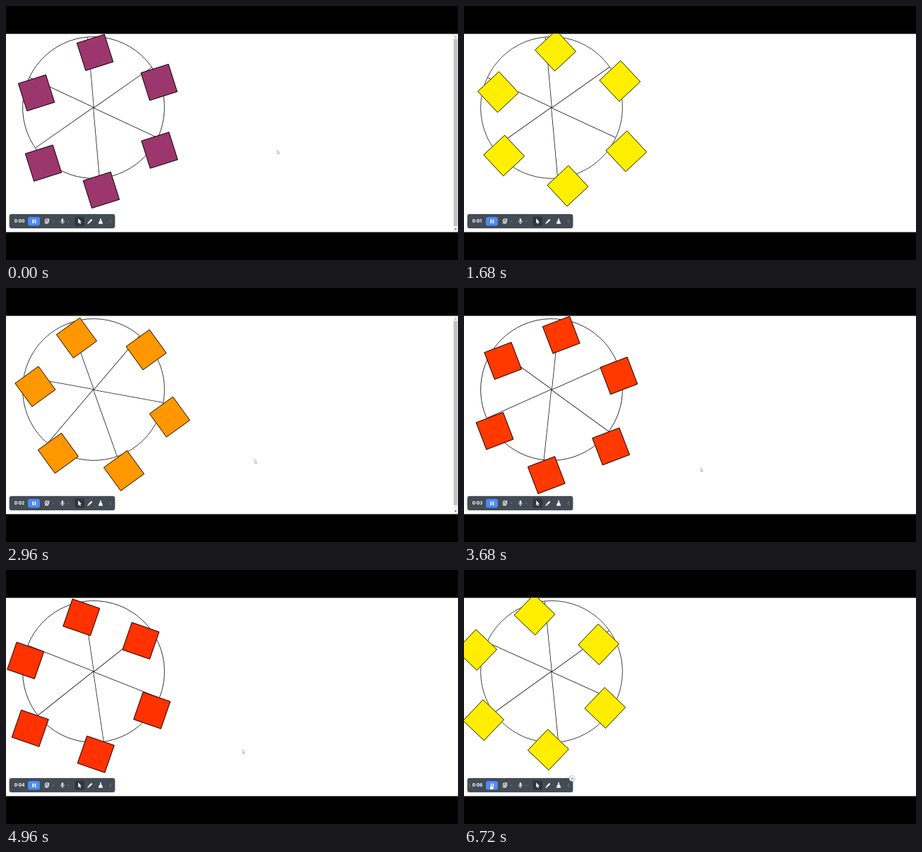
Animation of 640x360 px, one loop 6800 ms. Source, as an HTML page with a canvas:

```html
<!DOCTYPE html>
<html lang="en">
<head>
<meta charset="utf-8">
<title>Ferris wheel</title>
<style>
html, body { margin: 0; width: 100%; height: 100%; overflow: hidden; background: #000; }
canvas { display: block; width: 640px; height: 360px; }
</style>
</head>
<body>
<canvas id="stage" width="640" height="360"></canvas>
<script>
const ctx = document.getElementById('stage').getContext('2d');
const LOOP = 6800, STEP = 80;
const START = 205, SPEED = 0.0356;      // degrees, degrees per ms
const ZOOM = 0.4;                       // page pixels to stage pixels
const PAGE = { top: 40, w: 1600, h: 700, edge: 1 };
const HUB = { x: 310, y: 260 };         // wheel centre on the page
const RAD = Math.PI / 180;
const SIDE = 104;

// cabin pivots relative to the hub: three, then their opposites
const CABINS = [1, -1].flatMap(d => {
  const y = 1.25 + 216.25 * d;
  return [[240.5 * d, 0], [113 * d, y], [-125 * d - 12, y]];
});

const RED = [255, 25, 0], YELLOW = [255, 240, 0], PURPLE = [137, 20, 131];
const PAINT = [RED, YELLOW, PURPLE, YELLOW, RED];

// pointer moves: from ms, to ms, x, y
const REST = [384, 204];
const MOVES = [[800, 2400, 352, 243], [2960, 3600, 335, 254.5],
               [5120, 5760, 54, 293.5], [5840, 6240, 38, 303.5]];
const HOVER_AT = 5840, HAND_AT = 6000;

const BAR = '#434b55', INK = '#f4f5f6', DIM = '#9197a0';

const mix = (a, b, k) => a + (b - a) * k;
const clamp = k => Math.max(0, Math.min(1, k));

// cubic-bezier(.42, 0, .58, 1)
function easeInOut(x) {
  let lo = 0, hi = 1;
  for (let i = 0; i < 24; i++) {
    const s = (lo + hi) / 2, r = 1 - s;
    const bx = 3 * r * s * (0.42 * r + 0.58 * s) + s * s * s;
    if (bx < x) lo = s; else hi = s;
  }
  return lo * lo * (3 - 2 * lo);
}

function cabinColor(p) {
  const i = Math.floor(p * 4), k = easeInOut(p * 4 - i);
  return `rgb(${PAINT[i].map((v, n) => Math.round(mix(v, PAINT[i + 1][n], k)))})`;
}

// Lowest page point of the wheel's turned bounding box
function pageBottom(turn, spin) {
  const c = Math.cos(spin), s = Math.sin(spin);
  const xs = [-252, 252], ys = [-252, 252];
  for (const [px, py] of CABINS)
    for (const u of [-SIDE / 2, SIDE / 2])
      for (const v of [0, SIDE]) {
        xs.push(px + u * c - v * s);
        ys.push(py + u * s + v * c);
      }
  const reach = (list, k) => Math.max(...list.map(v => v * k));
  return HUB.y + reach(xs, Math.sin(turn)) + reach(ys, Math.cos(turn));
}

function drawWheel(turn, spin, color) {
  ctx.save();
  ctx.translate(HUB.x, HUB.y);
  ctx.rotate(turn);
  ctx.strokeStyle = ctx.fillStyle = '#1c1c1c';
  ctx.lineWidth = 2;
  ctx.beginPath();
  ctx.arc(0, 0, 251, 0, 7);
  ctx.stroke();
  for (let i = 0; i < 6; i++) {
    ctx.fillRect(0, 0, 250, 2);
    ctx.rotate(60 * RAD);
  }
  ctx.strokeStyle = '#000';
  ctx.fillStyle = color;
  for (const [x, y] of CABINS) {
    ctx.save();
    ctx.translate(x, y);
    ctx.rotate(spin);
    ctx.fillRect(-SIDE / 2, 0, SIDE, SIDE);
    ctx.strokeRect(1 - SIDE / 2, 1, SIDE - 2, SIDE - 2);
    ctx.restore();
  }
  ctx.restore();
}

function drawScrollbar(bottom) {
  const w = 17, x = PAGE.w - w, mid = x + w / 2;
  ctx.fillStyle = '#f1f1f1';
  ctx.fillRect(x, 0, w, PAGE.h);
  ctx.fillStyle = '#c1c1c1';
  ctx.fillRect(x + 2, w, w - 4, (PAGE.h - 2 * w) * PAGE.h / bottom);
  const tip = (y, d, fill) => shape([[mid - 4, y - d], [mid, y + d], [mid + 4, y - d]], fill);
  tip(w / 2, -2.5, '#a3a3a3');
  tip(PAGE.h - w / 2, 2.5, '#505050');
}

function trace(pts) {
  ctx.beginPath();
  pts.forEach(([x, y]) => ctx.lineTo(x, y));
}

function shape(pts, fill) {
  trace(pts);
  ctx.closePath();
  ctx.fillStyle = fill;
  ctx.fill();
}

function stroke(pts, color, width) {
  trace(pts);
  ctx.strokeStyle = color;
  ctx.lineWidth = width;
  ctx.stroke();
}

function box(x, y, w, h, r, fill) {
  ctx.beginPath();
  ctx.roundRect(x, y, w, h, r);
  ctx.fillStyle = fill;
  ctx.fill();
}

function arc(x, y, r, end, width) {
  ctx.beginPath();
  ctx.arc(x, y, r, 0, end);
  ctx.strokeStyle = INK;
  ctx.lineWidth = width;
  ctx.stroke();
}

const disc = (x, y, r, fill) => box(x - r, y - r, 2 * r, 2 * r, r, fill);

function arrow(x, y, size, fill, line) {
  const pts = [[0, 0], [0, 5.4], [1.2, 4.4], [2, 6.2], [2.8, 5.8], [2, 4.1], [3.5, 3.8], [0, 0]]
    .map(([u, v]) => [x + u * size, y + v * size]);
  shape(pts, fill);
  if (line) stroke(pts, line, 0.5);
}

function drawToolbar(t, hover) {
  ctx.save();
  ctx.shadowColor = 'rgba(0,0,0,.35)';
  ctx.shadowBlur = 2;
  box(4.8, 295, 149.4, 20, 3, BAR);
  ctx.restore();

  ctx.fillStyle = INK;
  ctx.font = '800 6px Inter, Roboto, sans-serif';
  ctx.textBaseline = 'middle';
  ctx.fillText('0:0' + Math.max(0, Math.floor((t - 20) / 1000)), 11.8, 305.3);

  box(31, 299, 17, 12.4, 3, '#4b8bf5');
  for (const x of [37.4, 40.6]) box(x, 302.4, 1.7, 5.6, 0.3, '#fff');
  for (const x of [67, 88.2]) disc(x, 305.2, 0.7, DIM);

  // camera off
  arc(58, 304.4, 2.6, 7, 1.1);
  disc(58, 304.4, 1, INK);
  box(56, 307.6, 4, 1, 0.4, INK);
  stroke([[54.6, 308.6], [61.6, 301.4]], INK, 0.9);

  // microphone
  box(78.6, 301.2, 2.6, 4.8, 1.3, INK);
  arc(79.9, 304.6, 2.6, Math.PI, 0.8);
  box(79.4, 307, 1, 2, 0, INK);

  // arrow, pen, stamp, fold
  box(97.6, 298.4, 13.6, 13.4, 2, '#30353c');
  arrow(102.2, 301, 1.35, INK);
  stroke([[116.9, 307.3], [121.6, 302.6]], INK, 2.2);
  shape([[115.4, 308.9], [115.8, 306.8], [117.6, 308.5]], INK);
  box(133.1, 301, 1.8, 3.6, 0.8, INK);
  shape([[132.2, 304.2], [135.8, 304.2], [137.2, 308.8], [130.8, 308.8]], INK);
  stroke([[149, 302.8], [146.9, 305.2], [149, 307.6]], DIM, 0.8);

  if (!hover) return;
  for (const x of [6.9, 8.6])
    for (const y of [303.4, 305.3, 307.2]) disc(x, y, 0.5, DIM);
  disc(153, 295.6, 4.2, '#7b828b');
  disc(153, 295.6, 3.7, '#fff');
  for (const d of [-1.4, 1.4])
    stroke([[153 - d, 294.2], [153 + d, 297]], BAR, 0.8);
}

function drawPointer(t) {
  if (t >= MOVES[0][0] && t < MOVES[0][1]) return;
  let [x, y] = REST;
  for (const [from, to, mx, my] of MOVES) {
    const k = easeInOut(clamp((t - from) / (to - from)));
    x = mix(x, mx, k);
    y = mix(y, my, k);
  }
  if (t < HAND_AT) return arrow(x, y, 1, '#fff', '#7a7a7a');
  for (const [grow, fill] of [[0.4, '#4a5560'], [0, '#fff']]) {
    box(x - grow, y - grow, 1.3 + 2 * grow, 6 + 2 * grow, 0.6, fill);
    box(x - 1.2 - grow, y + 3.2 - grow, 5.2 + 2 * grow, 4.4 + 2 * grow, 1.4, fill);
  }
  box(x, y, 1.3, 6, 0.6, '#fff');
}

function draw(now) {
  const t = Math.floor((now % LOOP) / STEP) * STEP;
  const deg = START + SPEED * t;
  const p = (deg % 360) / 360;
  const turn = deg * RAD, spin = -2 * Math.PI * easeInOut(p);

  ctx.fillStyle = '#000';
  ctx.fillRect(0, 0, 640, 360);
  ctx.save();
  ctx.translate(0, PAGE.top);
  ctx.scale(ZOOM, ZOOM);
  ctx.beginPath();
  ctx.rect(0, -PAGE.edge, PAGE.w, PAGE.h + 2 * PAGE.edge);
  ctx.fillStyle = '#fff';
  ctx.fill();
  ctx.clip();
  drawWheel(turn, spin, cabinColor(p));
  const bottom = pageBottom(turn, spin);
  if (bottom > PAGE.h) drawScrollbar(bottom);
  ctx.restore();

  drawToolbar(t, t >= HOVER_AT);
  drawPointer(t);
}

const start = performance.now();
function tick() {
  draw(performance.now() - start);
  requestAnimationFrame(tick);
}
tick();
</script>
</body>
</html>
```
